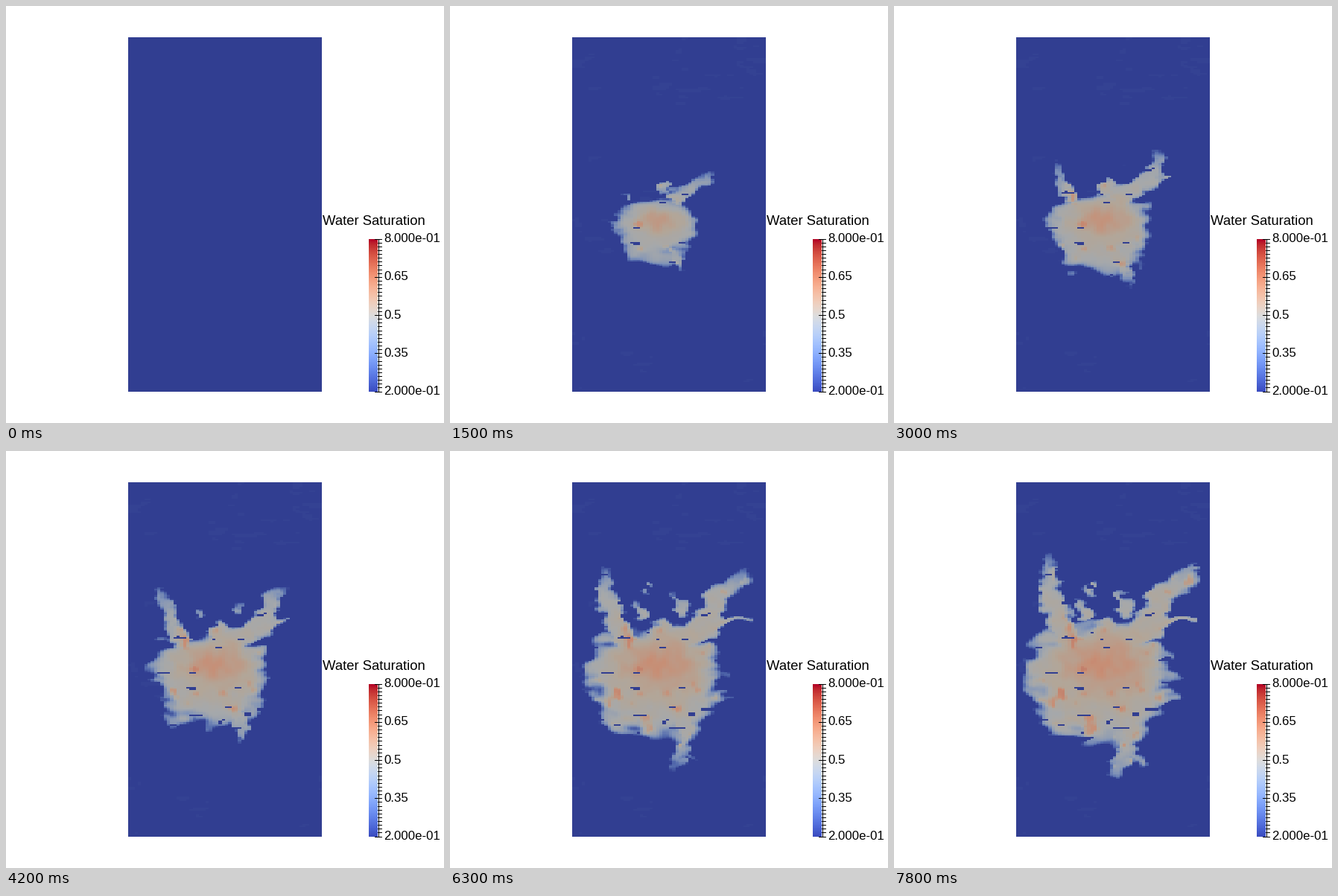
These frames come from a looping animation (588x560 px, 8000 ms). A matplotlib script:

```python
import numpy as np
import matplotlib.pyplot as plt
from matplotlib.animation import FuncAnimation
from matplotlib.colors import LinearSegmentedColormap

W, H, DPI = 588, 560, 100
LEFT, RIGHT, TOP, BOTTOM = 164, 424, 42, 518
NX, NY = 60, 220
INTERVAL, FRAMES, HOLD = 100, 80, 3
LAST = 7800

cell_x = LEFT + (np.arange(NX) + 0.5) * (RIGHT - LEFT) / NX
cell_y = TOP + (np.arange(NY) + 0.5) * (BOTTOM - TOP) / NY
X, Y = np.meshgrid(cell_x, cell_y)


def noise(seed, sx, sy):
    """Smooth random field, unit variance; sx, sy are blur widths in cells."""
    white = np.random.default_rng(seed).normal(size=(NY, NX))
    fx, fy = np.meshgrid(np.fft.fftfreq(NX), np.fft.fftfreq(NY))
    blur = np.exp(-2 * np.pi**2 * ((fx * sx) ** 2 + (fy * sy) ** 2))
    field = np.fft.ifft2(np.fft.fft2(white) * blur).real
    return (field - field.mean()) / field.std()


streak = noise(11, 1.6, 0.8)
patch = noise(7, 1.0, 2.0)
# Uneven rock bends the flow
WX = X + 3 * noise(2, 1.5, 2) + 2 * noise(4, 0.9, 0.9)
WY = Y + 2.5 * noise(3, 2, 2)


def body(cx, cy, rx, up, down):
    """Arrival time of the main front, an ellipse that slows as it grows."""
    ry = np.where(WY < cy, up, down)
    reach = np.hypot((WX - cx) / rx, (WY - cy) / ry)
    return LAST * (reach * (1 + 0.07 * noise(5, 2.2, 2.5))) ** 2.8


def finger(radius, *nodes):
    """Arrival time along a path of nodes (x, y, seconds), widening with age."""
    path = np.array(nodes, float)
    at = np.linspace(0, len(path) - 1, 8 * len(path))
    columns = [np.interp(at, np.arange(len(path)), c) for c in path.T]
    return np.min([1000 * t + 4000 * (np.hypot(WX - x, WY - y) / radius) ** 2.4
                   for x, y, t in zip(*columns)], axis=0)


arrival = np.min([
    body(276, 295, 101, 62, 97),
    finger(16, (236, 255, 1.2), (210, 196, 3.4), (210, 143, 6.9)),
    finger(17, (303, 258, 0.1), (345, 232, 0.9), (358, 198, 2.6), (400, 162, 6.2)),
    finger(4, (360, 227, 1.5), (400, 226, 4.8)),
    finger(13, (305, 335, 0.6), (317, 385, 3.4), (297, 433, 6.6)),
    finger(11, (316, 398, 4.8), (331, 422, 6.9)),
    finger(16, (289, 244, 0.4)),
    finger(11, (260, 220, 3.2), (250, 207, 5.2)),
    finger(11, (267, 184, 4.3)),
    finger(9, (312, 215, 2.8), (302, 192, 5.5)),
], axis=0)
away = np.hypot(X - 288, Y - 287) > 22
arrival[away & (streak < -1.9)] = 1e6

specks = (streak > 1.0) & (noise(21, 4, 9) > 0.9)
hot = np.clip(patch - 1.1, 0, 1)


def saturation(ms):
    age = np.clip(ms - arrival, 0, None)
    wet = 1 - np.exp(-age / (150 + 0.13 * ms))
    sec = ms / 1000
    core = np.exp(-((X - 283) / (25 + 4 * sec)) ** 2
                  - ((Y - 287) / (20 + 2 * sec)) ** 2)
    heat = 0.075 * np.maximum(core, hot)
    ripe = 0.04 * (1 - np.exp(-age / 3000))
    s = 0.2 + wet * (0.295 + ripe + heat + 0.008 * patch)
    return s + 0.014 * specks * (wet < 0.01) * min(1, ms / 900)


stops = [(0, (49, 62, 145)), (0.2, (84, 107, 173)), (0.35, (128, 147, 184)),
         (0.5, (166, 169, 171)), (0.57, (179, 166, 152)), (0.68, (200, 142, 117)),
         (1, (150, 20, 40))]
shaded = LinearSegmentedColormap.from_list(
    "shaded", [(p, tuple(v / 255 for v in c)) for p, c in stops])

fig = plt.figure(figsize=(W / DPI, H / DPI), dpi=DPI, facecolor="white")
ax = fig.add_axes([0, 0, 1, 1])
field = ax.imshow(saturation(0), cmap=shaded, vmin=0.2, vmax=0.8, aspect="auto",
                  interpolation="nearest", extent=(LEFT, RIGHT, BOTTOM, TOP))
ax.imshow(np.linspace(1, 0, 205)[:, None], cmap="coolwarm", vmin=0, vmax=1,
          aspect="auto", interpolation="nearest", extent=(487, 499, 518, 313))
ax.set_xlim(0, W)
ax.set_ylim(H, 0)
ax.axis("off")


def label(x, y, text, px):
    ax.text(x, y, text, fontsize=px * 72 / DPI, family="Liberation Sans",
            color="black", va="baseline")


def line(x0, y0, x1, y1):
    ax.plot([x0, x1], [y0, y1], color="black", lw=72 / DPI,
            antialiased=False, solid_capstyle="butt")


label(425, 294.5, "Water Saturation", 18.5)
line(499.5, 312.5, 499.5, 517.5)
for i in range(41):
    y = 312.5 + i * 5.125
    line(495 if i % 10 == 0 else 499, y, 504, y)
for i, text in enumerate(["8.000e-01", "0.65", "0.5", "0.35", "2.000e-01"]):
    label(507, 317 + i * 51.25, text, 16.8)


def update(i):
    field.set_data(saturation(i // HOLD * HOLD * INTERVAL))
    return [field]


anim = FuncAnimation(fig, update, frames=FRAMES, interval=INTERVAL,
                     repeat=True, repeat_delay=0, blit=False)
plt.show()
```
